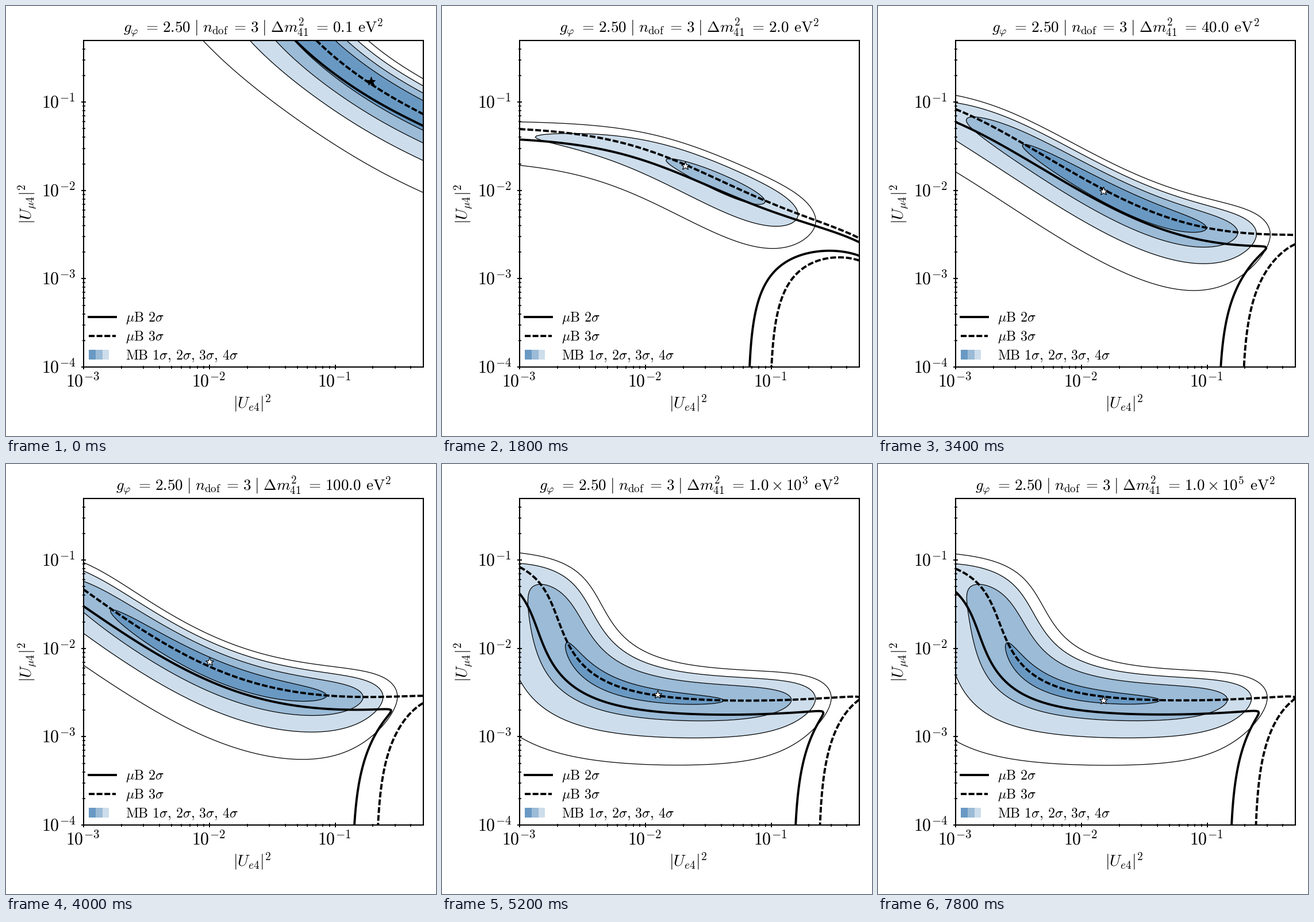
A matplotlib script that plays this animation: 748 px wide and 748 px high, repeating every 8 s.

```python
import numpy as np
import matplotlib.pyplot as plt
from matplotlib.animation import FuncAnimation
from matplotlib.patches import Rectangle

SIZE, DPI, FRAMES, STEP = 748, 200, 40, 200
X0, X1, Y0, Y1 = 135, 725.6, 628, 60
DEC_X, DEC_Y = 218.8, 153.6
BLUES = ["#6999c3", "#9bbbd7", "#cdddeb"]
LEVELS = [3.53, 8.02, 14.16, 22.06]   # 1 to 4 sigma, three degrees of freedom
LIMITS = [1, 1.45]                    # 2 and 3 sigma
DASHES = ["-", (0, (2.6, 0.9))]
THICK, THIN = 1.4, 0.45

plt.rcParams["mathtext.fontset"] = "cm"

# Model constants at a few masses, interpolated in the logarithm.
STEPS = [0, 4, 9, 17, 23, 39]
MODEL = dict(
    # signal = ab / (osc + flat a + wall b) + (b / cap)^1.4
    osc=[1.43e-2, 1.47e-3, 3.11e-4, 8.2e-5, 8e-6, 4e-7],
    flat=[1e-2, 1e-4, 3e-5, 1.63e-3, 1.6e-3, 1.65e-3],
    wall=[1.7e-2, 1e-4, 5e-6, 5e-5, 9e-4, 1.45e-3],
    cap=[9, 0.285, 0.041, 0.136, 0.16, 0.096],
    # disappearance: loss of excess, deficit limit, refill by the signal
    loss=[0.9, 0.36, 0.1, 1, 1, 1],
    deficit=[2, 0.5, 0.0619, 0.1106, 0.1328, 0.1328],
    refill=[1, 1, 1.37, 0.92, 0.55, 0.5],
    # chi-square: minimum, mixing scales, pull to the best fit
    floor=[0.05, 1, 3.3, 0.5, 2.6, 2.6],
    a_max=[30, 5, 0.78, 1, 1, 1],
    b_max=[60, 6.2, 0.5, 1, 1, 1],
    pull=[0.01, 3, 0.01, 0.01, 0.01, 0.01],
    star_a=[0.193, 0.0177, 0.0207, 0.0149, 0.0068, 0.0149],
    star_b=[0.171, 0.108, 0.019, 0.0098, 0.0051, 0.0026],
)


def to_px(a, b):
    return X0 + DEC_X * (np.log10(a) + 3), Y0 - DEC_Y * (np.log10(b) + 4)


A, B = np.meshgrid(np.geomspace(1e-3, 0.501, 240), np.geomspace(1e-4, 0.501, 240))
PX, PY = to_px(A, B)


def constants(k):
    j = min(np.searchsorted(STEPS, k, side="right") - 1, len(STEPS) - 2)
    t = k - STEPS[j]
    # oscillations average out at large mass, so the last stretch settles
    w = 1 - np.exp(-0.5 * t) if j == len(STEPS) - 2 else t / (STEPS[j + 1] - STEPS[j])
    return {n: v[j] ** (1 - w) * v[j + 1] ** w for n, v in MODEL.items()}


def fields(m):
    """Chi-square of the filled regions and test value of the two limits."""
    signal = A * B / (m["osc"] + m["flat"] * A + m["wall"] * B) + (B / m["cap"]) ** 1.4
    lost = A * (1 - 0.8 * A)

    ratio = signal / (LIMITS[1] + lost / m["loss"])
    z = (ratio - 1) / (0.185 * np.sqrt(np.maximum(ratio, 1)))
    a, b = A / m["a_max"], B / m["b_max"]
    chi2 = (m["floor"] + z ** 2 + 10 * a + 180 * a ** 2 + 70 * b + 590 * b ** 2
            + m["pull"] * np.log10(A / m["star_a"]) ** 2)

    excess = signal - lost / m["loss"]
    missing = lost / m["deficit"] - m["refill"] * signal
    sharp = 15
    return chi2, np.logaddexp(sharp * excess, sharp * missing) / sharp


def title_text(k):
    v = 10 ** (6 * k / (FRAMES - 1) - 1)
    if v < 999:
        num = f"{float(f'{v:.0e}'):.1f}"
    else:
        mant, exp = f"{v:.1e}".split("e")
        num = rf"{mant}\times10^{{{int(exp)}}}"
    eq, bar = r"=\hspace{0.12}", r"\hspace{0.3}|\hspace{0.3}"
    return (rf"$g_{{\varphi}}\hspace{{0.33}}{eq}2.50{bar}"
            rf"n_{{\mathrm{{dof}}}}\hspace{{0.25}}{eq}3{bar}"
            rf"\Delta m^2_{{41}}\hspace{{0.3}}{eq}{num}"
            r"\hspace{0.4}\mathrm{eV}^2$")


fig = plt.figure(figsize=(SIZE / DPI, SIZE / DPI), dpi=DPI, facecolor="white")
ax = fig.add_axes([X0 / SIZE, 1 - Y0 / SIZE, (X1 - X0) / SIZE, (Y0 - Y1) / SIZE])


def label(x, y, s, size, **kw):
    kw = {"ha": "left", "va": "baseline", **kw}
    return fig.text(x / SIZE, 1 - y / SIZE, s, fontsize=size, **kw)


def minor(first):
    logs = np.add.outer(np.arange(first, 0), np.log10(np.arange(2, 10))).ravel()
    return logs[logs < np.log10(0.49)] - first


ax.set_xticks(X0 + DEC_X * np.arange(3), labels=[""] * 3)
ax.set_yticks(Y0 - DEC_Y * np.arange(4), labels=[""] * 4)
ax.set_xticks(X0 + DEC_X * minor(-3), minor=True)
ax.set_yticks(Y0 - DEC_Y * minor(-4), minor=True)
ax.tick_params(direction="inout", length=3, width=0.7)
ax.tick_params(which="minor", direction="inout", length=1.8, width=0.6)
for spine in ax.spines.values():
    spine.set_linewidth(0.75)

for i in range(3):
    label(X0 + DEC_X * i - 31, 662, f"$10^{{{i - 3}}}$", 10.8)
for i in range(4):
    label(62, Y0 - DEC_Y * i + 10, f"$10^{{{i - 4}}}$", 10.8)
label(428, 699, r"$|U_{e4}|^2$", 9.9, ha="center")
label(45, 345, r"$|U_{\mu 4}|^2$", 9.9, ha="center", rotation=90, rotation_mode="anchor")
title = label(430.5, 46, "", 9.75, ha="center")
star, = ax.plot([], [], "*", ms=5.6, mec="black", mew=0.4, zorder=5)

# legend
for y, ls in zip((541, 573.5), DASHES):
    ax.plot([144, 191], [y, y], color="black", lw=THICK, ls=ls, zorder=4)
for i, color in enumerate(BLUES):
    ax.add_patch(Rectangle((144 + 11.8 * i, 598), 11.8, 17, fc=color, lw=0, zorder=4))
sigmas = r",\hspace{0.18}".join(rf"{i}\sigma" for i in (1, 2, 3, 4))
for i, s in enumerate((r"\mu\mathrm{B}\hspace{0.38}2\sigma",
                       r"\mu\mathrm{B}\hspace{0.38}3\sigma",
                       r"\mathrm{MB}\hspace{0.38}" + sigmas)):
    label(208, 549 + 33 * i, f"${s}$", 8.65)

drawn = []


def update(k):
    while drawn:
        drawn.pop().remove()
    m = constants(k)
    chi2, limit = fields(m)
    drawn.append(ax.contourf(PX, PY, chi2, [0] + LEVELS[:3], colors=BLUES, zorder=1))
    drawn.append(ax.contour(PX, PY, chi2, LEVELS, colors="black",
                            linewidths=THIN, zorder=2))
    drawn.append(ax.contour(PX, PY, limit, LIMITS, colors="black",
                            linewidths=THICK, linestyles=DASHES, zorder=3))
    ax.set(xlim=(X0, X1), ylim=(Y0, Y1))

    x, y = to_px(m["star_a"], m["star_b"])
    star.set_data([x], [y])
    star.set_markerfacecolor("black" if k == 0 else "white")
    title.set_text(title_text(k))
    return [title, star, *drawn]


anim = FuncAnimation(fig, update, frames=FRAMES, interval=STEP, repeat=True, repeat_delay=0)
plt.show()
```
